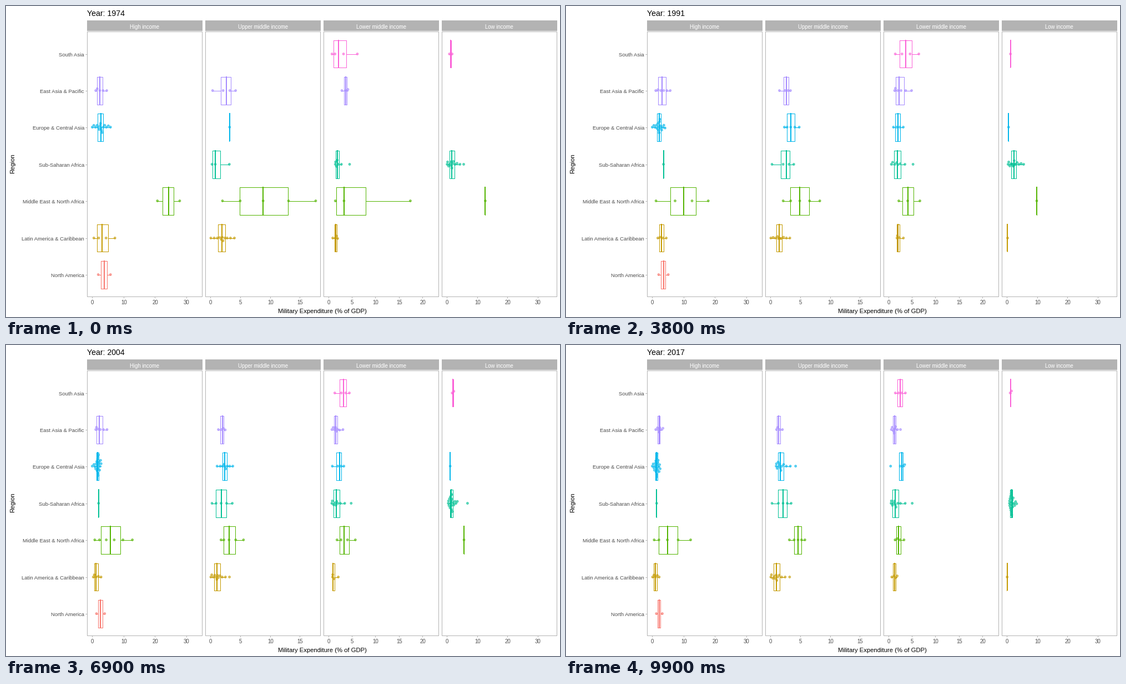
Write a matplotlib script that moves like this. It is 998 px wide and 561 px high and loops after 10000 ms.

```python
import math
from functools import lru_cache

import numpy as np
import matplotlib.pyplot as plt
from matplotlib.animation import FuncAnimation
from matplotlib.collections import LineCollection
from matplotlib.patches import Rectangle

W, H, DPI = 998, 561, 100
PX = 72 / DPI
FRAMES = 100
START, END = 1974, 2017
DOT = 4.3

plt.rcParams["font.family"] = "Liberation Sans"

# title, left edge, pixels per unit, tick step, last tick
PANELS = {
    "high": ("High income", 146, 5.667, 10, 30),
    "upper": ("Upper middle income", 359, 10.77, 5, 15),
    "lower": ("Lower middle income", 572, 8.45, 5, 20),
    "low": ("Low income", 785, 5.475, 10, 30),
}
REGIONS = {
    "sa": ("South Asia", "#FB61D7"),
    "ea": ("East Asia & Pacific", "#A58AFF"),
    "eu": ("Europe & Central Asia", "#00B6EB"),
    "ss": ("Sub-Saharan Africa", "#00C094"),
    "me": ("Middle East & North Africa", "#53B400"),
    "la": ("Latin America & Caribbean", "#C49A00"),
    "na": ("North America", "#F8766D"),
}
ROW_Y = {key: 86 + 66.4 * i for i, key in enumerate(REGIONS)}


def to_x(panel, v):
    _, left, scale, _, _ = PANELS[panel]
    return left + 9.4 + scale * np.asarray(v)


def pixel(v):
    return np.floor(v) + .5


def along(points, year):
    """Value at a year on a line through points evenly spaced in time."""
    points = np.atleast_1d(points)
    return np.interp(year, np.linspace(START, END, len(points)), points)


@lru_cache(maxsize=None)
def swarm(xs):
    """Vertical offsets that keep neighbouring dots apart."""
    ys = []
    for i, x in enumerate(xs):
        near = [(x - xs[j], ys[j]) for j in range(i) if x - xs[j] < DOT]
        tries = [0.0]
        for dx, y in near:
            dy = math.sqrt(DOT ** 2 - dx ** 2)
            tries += [y - dy, y + dy]
        tries.sort(key=lambda y: (round(abs(y), 3), y))
        ys.append(next(y for y in tries if all(
            dx ** 2 + (y - b) ** 2 > DOT ** 2 - .01 for dx, b in near)))
    return np.array(ys)


class Group:
    """Countries of one region and income class, as a skewed distribution."""

    def __init__(self, panel, region, n, hi, lo=None, med=None, span=(START, END)):
        self.panel, self.region, self.n, self.span = panel, region, n, span
        self.hi, self.lo, self.med = hi, hi if lo is None else lo, med

    def count(self, year):
        return round(along(self.n, int(year)))

    def quantile(self, p, year, n):
        lo, hi = along(self.lo, year), along(self.hi, year)
        if n > 6:  # large groups crowd around the median
            p = p + .1 * np.sin(2 * np.pi * p)
        bend = 1
        if self.med is not None and hi - lo > .01:
            mid = np.clip((along(self.med, year) - lo) / (hi - lo), .05, .95)
            bend = math.log(mid) / math.log(.5)
        return lo + (hi - lo) * p ** bend

    def box(self, year):
        return self.quantile(np.array([.25, .5, .75]), year, self.count(year))

    def dots(self, year):
        n, first = self.count(year), int(year)
        p = np.linspace(0, 1, n) if n > 1 else np.array([.5])
        a, b = (swarm(tuple(to_x(self.panel, self.quantile(p, y, n)).tolist()))
                for y in (first, first + 1))
        return self.quantile(p, year, n), a + (b - a) * (year - first)


GROUPS = [
    Group("high", "na", 2, (5.8, 6.4, 3.95, 3.95, 3.2), (1.9, 2.3, 1.8, 1.2, 1.3)),
    Group("high", "la", (4, 5), (7.2, 6.4, 2.75, 2.8, 2.2),
          (.5, 2.4, 1.2, .1, .1), (3.15, 4.2, 1.8, 1.05, 1.05)),
    Group("high", "me", (2, 4, 5, 6, 5),
          (27.8, 21, 21.5, 18, 15.2, 13.5, 12.2, 8, 12.2),
          (20.7, 6, 1.5, 1.2, 1, .9, .7, .6, .6),
          (24.2, 17.6, 11, 10, 9.8, 7, 4.7, 5.6, 4.8)),
    Group("high", "ss", 1, (7, 4.9, 2.4, 1.9, 1.4), span=(1980, END)),
    Group("high", "ea", (5, 7), (4.6, 5.6, 5.8, 4.4, 3.4), 1.1,
          (2.4, 3.6, 2.75, 2.05, 2.2)),
    Group("high", "eu", (16, 17, 17, 22, 22), (5.8, 4.6, 3.6, 2.6, 2.5), 0,
          (2.7, 2.6, 1.8, 1.75, 1.4)),
    Group("upper", "la", (11, 12), (4, 3.85, 2.7, 3.3, 3.2), .05,
          (1.95, 1.65, 1.35, 1.05, 1)),
    Group("upper", "me", 5, (17.6, 9.8, 6.9, 5.15, 5.75),
          (2, 1.85, 2.35, 1.6, 3.15), (8.8, 5.7, 4.2, 2.8, 4.6)),
    Group("upper", "ss", (3, 4, 5, 5, 5), (3.15, 4, 3.8, 3.6, 3.45), .25,
          (.8, 3.3, 2.05, 1.7, 2.1)),
    Group("upper", "eu", (1, 3, 8, 9, 13), (3.2, 5.5, 4.2, 3.6, 4.2),
          (3.2, 3.5, 1.3, 1.05, .95), (3.2, 4.4, 2.5, 2.4, 1.65)),
    Group("upper", "ea", 4, (4.2, 3.85, 2.9, 2.35, 2),
          (.35, 1.2, 1.75, 1.2, 1), (2.7, 3.3, 2.15, 1.95, 1.35)),
    Group("lower", "sa", 4, (6.1, 7, 5.9, 4, 3.55),
          (.7, 1.15, 1.6, 1.2, 1.4), (2.1, 3.5, 3.8, 3, 2.4)),
    Group("lower", "ea", (3, 5, 7, 8, 8), (4.1, 3, 6.5, 2.1, 2.5),
          (2.8, 1.2, 1.3, .5, .55), (3.65, 2, 2.4, 1.3, 1.2)),
    Group("lower", "eu", 4, (3.1, 3.1, 3.4), (1, 1, .4), (2, 2, 2.75),
          span=(1990, END)),
    Group("lower", "ss", (7, 11), (4.45, 5.1, 5.25, 4.65, 5),
          (1.4, .2, .85, .6, .5), (1.8, 1.95, 1.7, 1.6, 1.4)),
    Group("lower", "me", (3, 4),
          (17.4, 6.6, 7.6, 6.7, 5.85, 5.7, 5.65, 3.6, 3.25),
          (1.4, 2.3, 2, 1.7, 1.35), (3.25, 4.2, 3.9, 3.1, 2.1)),
    Group("lower", "la", 4, (1.9, 4.2, 2.2, 2, 1.8),
          (.85, 2.4, 1.2, .7, .65), (1.55, 2.75, 1.35, .85, 1.3)),
    Group("low", "sa", (2, 1, 1, 2, 2), (1.7, 1.3, 1, 2.6, 1.5),
          (.8, 1.3, 1, 1.9, 1.05)),
    Group("low", "eu", 1, (.5, .5, .55, 1.2, 1.2), span=(1990, 2014)),
    Group("low", "ss", (13, 15, 15, 19, 20), (5.5, 7, 4.2, 3.2, 3.2),
          (.05, .2, .5, .4, .8), (1.65, 2.8, 1.7, 1.4, 1.5)),
    Group("low", "me", 1, (12.6, 15.9, 14.5, 10, 7.1, 6, 5.3, 5.1, 5.1),
          span=(START, 2014)),
    Group("low", "la", 1, .2, span=(1990, 1999)),
    Group("low", "la", 1, .05, span=(2015, END)),
]

# single far outliers: panel, region, years, values
LONERS = [
    ("low", "ss", (1976, 1984), (8, 8.8)),
    ("low", "ss", (1985, 1986, 1988), (20, 29.1, 27)),
    ("low", "ss", (1992, 1996), (14, 17.8)),
    ("low", "ss", (1993, 1994, 1996, 1997, 1998, 2000, 2003),
     (21.4, 13, 22, 13, 34.5, 33, 21)),
    ("low", "ss", (2003.5, 2012.6), (6.6, 9.6)),
    ("high", "eu", (1992, 1996), (12, 9)),
    ("high", "me", (2010, 2013), (14.5, 17.3)),
]

fig = plt.figure(figsize=(W / DPI, H / DPI), dpi=DPI, facecolor="white")
ax = fig.add_axes([0, 0, 1, 1])
ax.set(xlim=(0, W), ylim=(H, 0))
ax.axis("off")


def label(x, y, s, px, color="black", ha="center", **kw):
    kw.setdefault("va", "baseline")
    return ax.text(x, y, s, fontsize=px * PX, color=color, ha=ha, **kw)


def tick(x, y):
    ax.plot(x, y, color="#B3B3B3", lw=PX, solid_capstyle="butt")


for key, (name, left, scale, step, last) in PANELS.items():
    ax.add_patch(Rectangle((left, 26), 208, 19, fc="#B3B3B3", lw=0))
    ax.add_patch(Rectangle((left + .5, 45.5), 207, 478, fc="none",
                           ec="#B3B3B3", lw=PX, zorder=5))
    label(left + 103.7, 41, name, 9.7, "white")
    for v in range(0, last + 1, step):
        x = pixel(to_x(key, v))
        tick([x, x], [524, 527])
        label(x, 538, str(v), 9.6, "#4D4D4D")
for key, (name, _) in REGIONS.items():
    y = pixel(ROW_Y[key])
    tick([143, 146], [y, y])
    label(141, y + 4, name, 9.5, "#4D4D4D", "right")
label(569.5, 553.5, "Military Expenditure (% of GDP)", 11.2)
label(12, 284.5, "Region", 11.2, va="center", rotation=90)
title = label(146, 17.5, "", 14.1, ha="left")

boxes = ax.add_collection(LineCollection([], lw=PX, capstyle="projecting", zorder=2))
medians = ax.add_collection(LineCollection([], lw=2 * PX, capstyle="butt", zorder=3))
dots = ax.scatter([], [], s=(3.8 * PX) ** 2, lw=PX, alpha=.6, zorder=4)


def draw(f):
    year = START + (END - START) * f / (FRAMES - 1)
    title.set_text(f"Year: {round(year)}")
    lines, line_cols, mids, mid_cols, pts, pt_cols = [], [], [], [], [], []

    def add_dots(panel, region, vals, offs):
        y = pixel(ROW_Y[region])
        pts.extend(zip(to_x(panel, vals), y + offs))
        pt_cols.extend([REGIONS[region][1]] * len(vals))

    for g in GROUPS:
        if not g.span[0] <= year <= g.span[1]:
            continue
        color, y = REGIONS[g.region][1], ROW_Y[g.region]
        vals, offs = g.dots(year)
        add_dots(g.panel, g.region, vals, offs)
        q1, mid, q3 = g.box(year)
        reach = 1.5 * (q3 - q1) + 1e-9
        inside = vals[(vals >= q1 - reach) & (vals <= q3 + reach)]
        lo, hi = min(inside.min(), q1), max(inside.max(), q3)
        lo, a, b, hi = pixel(to_x(g.panel, [lo, q1, q3, hi]))
        top, yc, bot = pixel(np.array([y - 24.9, y, y + 24.9]))
        lines += [[(a, top), (b, top), (b, bot), (a, bot), (a, top)],
                  [(lo, yc), (a, yc)], [(b, yc), (hi, yc)]]
        line_cols += [color] * 3
        xm = np.round(to_x(g.panel, mid))
        mids.append([(xm, top - .5), (xm, bot + .5)])
        mid_cols.append(color)
    for panel, region, years, values in LONERS:
        if years[0] <= year <= years[-1]:
            add_dots(panel, region, [np.interp(year, years, values)], np.zeros(1))

    boxes.set_segments(lines)
    boxes.set_color(line_cols)
    medians.set_segments(mids)
    medians.set_color(mid_cols)
    dots.set_offsets(pts)
    dots.set_color(pt_cols)
    return boxes, medians, dots, title


anim = FuncAnimation(fig, draw, frames=FRAMES, interval=100, repeat=True,
                     repeat_delay=0, blit=False)
plt.show()
```
